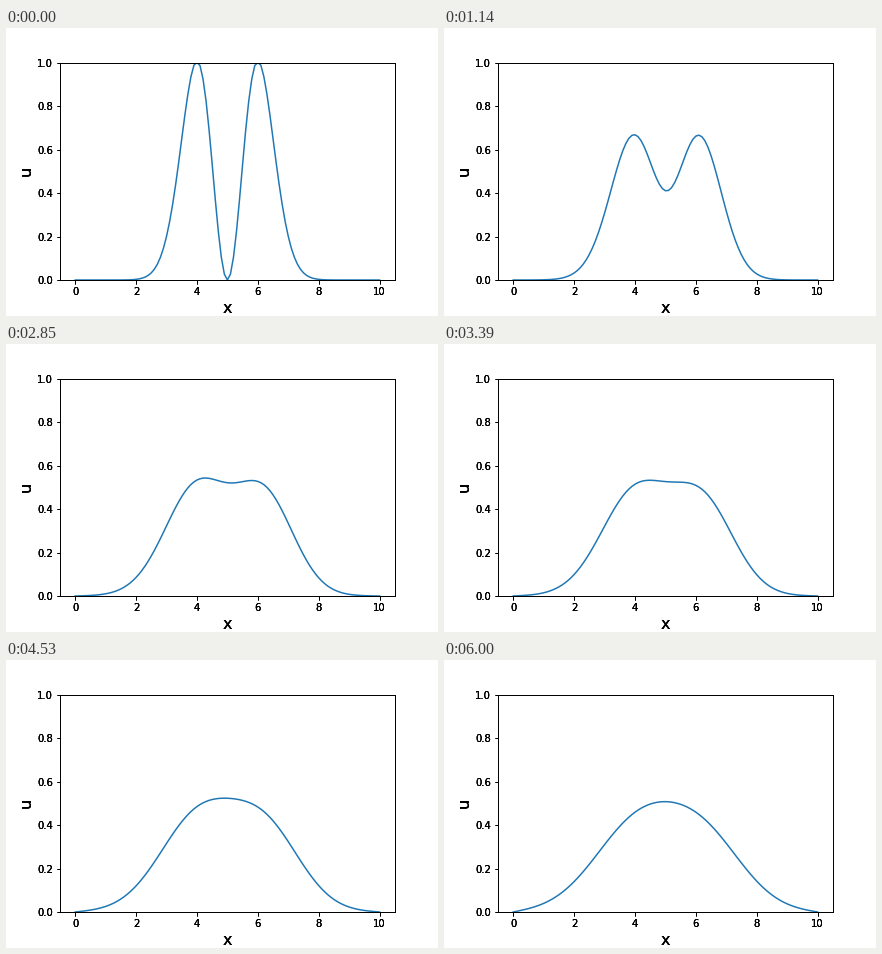
A matplotlib script that plays this animation: 432 by 288 pixels, repeating every 6.03 s.

```python
import numpy as np
import matplotlib.pyplot as plt
from matplotlib.animation import FuncAnimation

FRAMES, INTERVAL = 201, 30
BOX = [0.125, 0.125, 0.775, 0.755]
N = 101          # grid points
SUBSTEPS = 2
R = 0.204        # diffusion number per substep
SKEW = 0.28      # stencil offset, in cells

x = np.linspace(0, 10, N)


def initial():
    y2 = (x - 5) ** 2
    return 1.007 * y2 * np.exp(1 - y2)


def step(u):
    lap = np.zeros(N + 1)
    lap[1:N - 1] = u[2:] - 2 * u[1:-1] + u[:-2]
    out = u + R * ((1 - SKEW) * lap[:N] + SKEW * lap[1:])
    out[0] = out[-1] = 0
    return out


def solve():
    u, history = initial(), []
    for _ in range(FRAMES):
        history.append(np.minimum(u, 1))
        for _ in range(SUBSTEPS):
            u = step(u)
    return history


def make_axes(fig, face):
    ax = fig.add_axes(BOX, facecolor=face)
    ax.set(xlim=(-0.5, 10.5), ylim=(0, 1))
    ax.set_xticks(range(0, 11, 2))
    ax.set_xlabel("x", fontsize=16)
    ax.set_ylabel("u", fontsize=16)
    return ax


plt.rcParams.update({"font.family": "DejaVu Sans", "font.size": 10})
fig = plt.figure(figsize=(6, 4), dpi=72, facecolor="white")
ax = make_axes(fig, "white")
line, = ax.plot([], [], color="#1f77b4", lw=1.5)

# Repeated frames give the labels their heavy, hard edges
for _ in range(2):
    make_axes(fig, "none")

states = solve()


def update(i):
    line.set_data(x, states[i])
    return line,


anim = FuncAnimation(fig, update, frames=FRAMES, interval=INTERVAL,
                     repeat=True, repeat_delay=0)
plt.show()
```
